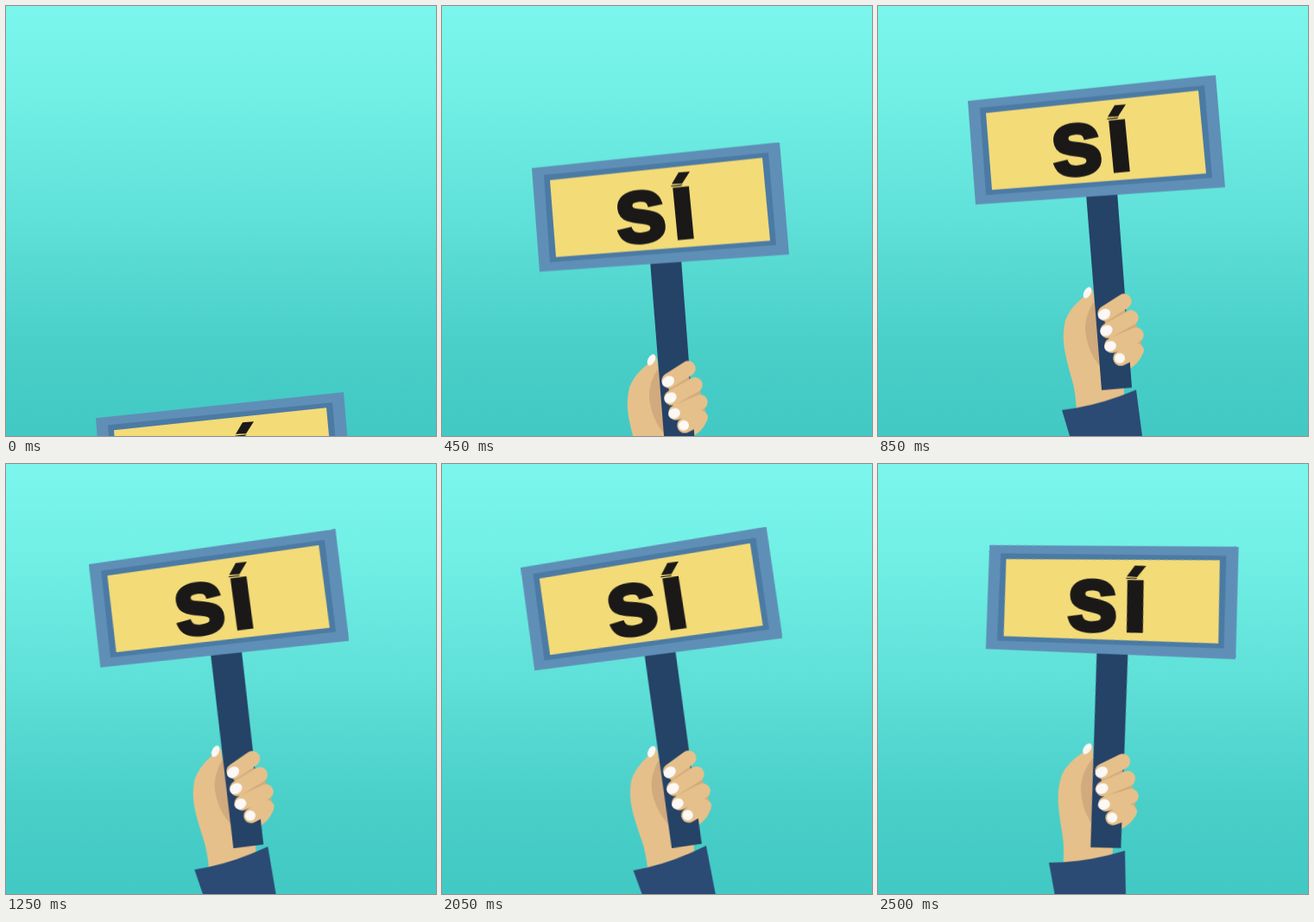
These frames come from a looping animation (498 by 498 pixels, 2550 ms). An HTML page:

```html
<!DOCTYPE html>
<html lang="es">
<head>
<meta charset="utf-8">
<title>Sí</title>
<style>
  html, body { margin: 0; width: 100%; height: 100%; overflow: hidden; }
  body { background: linear-gradient(#7cf6ed, #72f0e6 20%, #5fe0d8 50%, #49cec8 80%, #42c9c3); }
  svg { display: block; width: 498px; height: 498px; }

  .rise { animation: rise 2550ms infinite; }
  .wave { transform-origin: 262px 329px; animation: wave 2550ms infinite cubic-bezier(.37, 0, .63, 1); }

  @keyframes rise {
    0% { transform: translateY(368px); animation-timing-function: cubic-bezier(.39, .575, .565, 1); }
    32.3%, 100% { transform: none; }
  }
  @keyframes wave {
    0% { transform: rotate(0deg); }
    47.8% { transform: rotate(0deg); animation-timing-function: cubic-bezier(.39, .575, .565, 1); }
    54.5% { transform: rotate(-7.5deg); }
    69.8% { transform: rotate(7.5deg); }
    86.1% { transform: rotate(-7.5deg); }
    100% { transform: rotate(7deg); }
  }

  .skin { fill: #e6c08a; }
  .shade { fill: #d1aa7d; }
  .fingers { stroke: #e6c08a; stroke-width: 17.5; stroke-linecap: round; }
  .nails { fill: #fbf8f6; }
  .ink { fill: #1b1918; }
  text {
    font: bold 108px "Liberation Sans", Arial, sans-serif;
    letter-spacing: 4.5px;
    stroke: #1b1918;
    stroke-width: 4;
  }
</style>
</head>
<body>
<svg viewBox="0 0 498 498">
  <clipPath id="low"><rect x="-10" y="-61.5" width="140" height="75"/></clipPath>
  <g class="rise">
    <g class="wave">
      <!-- arm and palm -->
      <path class="skin" d="M238 337Q242 326 246 327Q250 328 250 340L262 380L284 410L285 456L230 472Q229 448 225 434Q219 414 216 398Q213 380 217 364Q222 350 238 337Z"/>
      <path class="shade" d="M250 342Q239 360 240 376Q243 402 258 418L262 350Z"/>
      <path class="shade" d="M272 350L296 358L302 378L306 395Q304 411 290 421L278 410Z"/>
      <path class="skin" d="M286 405L308 396Q306 412 290 421Z"/>
      <path fill="#2b4b74" d="M213 468L230 465.5Q262 460 299 444.5L306 498L316 570H242L222 498Z"/>

      <!-- sign -->
      <path fill="#254267" d="M240 205L276 202L294 442L259 445Z"/>
      <path fill="#5f8fb6" d="M104 110L391 80L402 210L113 230Z"/>
      <path fill="#4b7ba4" d="M118 118L378 92L387 199L125 219Z"/>
      <path fill="#f3db78" d="M125 124L371 98L380 194L132 213Z"/>
      <!-- the lettering has a lower, lighter accent than the font -->
      <text class="ink" clip-path="url(#low)" transform="translate(203 198) rotate(-5.5)">sí</text>
      <path class="ink" d="M266 128.5L274 115L287 114L278 128Z"/>

      <!-- grip -->
      <path class="shade" d="M262 364L285 350L303 392L282 402L268 384Z"/>
      <path class="fingers" d="M263 356L285 342M266 376L293 361M271 393L299 381M281 408L299 399"/>
      <g class="nails">
        <ellipse rx="4" ry="7" transform="translate(242.5 332) rotate(28)"/>
        <ellipse rx="7.5" ry="6" transform="translate(262 357) rotate(-32)"/>
        <ellipse rx="7.5" ry="6" transform="translate(264.5 376) rotate(-28)"/>
        <ellipse rx="7" ry="6" transform="translate(269 394) rotate(-24)"/>
        <ellipse rx="6" ry="6" transform="translate(280 408)"/>
      </g>
    </g>
  </g>
</svg>
</body>
</html>
```
